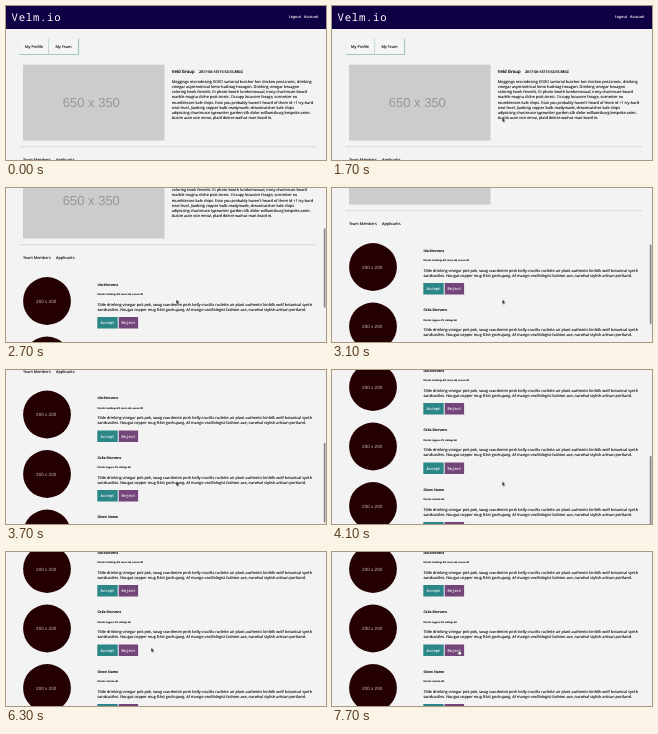
Recreate the animation shown at these times as an HTML page. Size 320 by 154 pixels, loop 8000 ms.

```html
<!DOCTYPE html>
<html lang="en">
<head>
<meta charset="utf-8">
<title>Team page</title>
<style>
  @property --scroll { syntax: "<number>"; inherits: true; initial-value: 0; }

  html, body { margin: 0; width: 100%; height: 100%; overflow: hidden; background: #f3f3f3; }
  svg {
    display: block; width: 320px; height: 154px;
    animation: scroll 8s infinite;
  }
  text {
    font: 3.83px "Open Sans", "Noto Sans", sans-serif;
    fill: #000; stroke: #000; stroke-width: .08;
    text-rendering: geometricPrecision; white-space: pre;
  }
  .light { fill: #fff; stroke: #fff; }
  .logo {
    font: 500 10.6px "Noto Sans Mono", "DejaVu Sans Mono", monospace;
    letter-spacing: .75px; fill: #fff; stroke: none;
  }
  .group { font-size: 4.3px; font-weight: 600; }
  .date { font-size: 3.55px; font-weight: 600; }
  .name { font-size: 3.5px; font-weight: 600; }
  .detail { font-size: 2.3px; font-weight: 600; }
  .button {
    font: 3.84px "Noto Sans Mono", "DejaVu Sans Mono", monospace;
    fill: #fff; stroke: #fff; text-anchor: middle;
  }
  .size {
    font: 13px "Liberation Sans", Arial, sans-serif;
    fill: #979797; stroke: none; text-anchor: middle;
  }
  .avatar { font-size: 4.6px; fill: #c4b8b8; }

  #page { transform: translateY(calc(var(--scroll) * -1px)); }
  #thumb { transform: translateY(calc(var(--scroll) * .478px)); animation: thumb 8s infinite step-end; }
  #cursor { animation: move 8s infinite linear, appear 8s infinite step-end; }
  #arrow { animation: arrow 8s infinite step-end; }
  #hand { animation: hand 8s infinite step-end; }

  /* the page moves in ticks of 100 ms */
  @keyframes scroll {
    0%, 22.5% { --scroll: 0; animation-timing-function: steps(5); }
    28.75% { --scroll: 37; animation-timing-function: steps(4); }
    33.75% { --scroll: 84; animation-timing-function: steps(4); }
    38.75% { --scroll: 118; animation-timing-function: steps(6); }
    46.25% { --scroll: 152.5; animation-timing-function: steps(4); }
    51.25%, 100% { --scroll: 180; }
  }
  @keyframes thumb {
    0% { opacity: 0; }
    23.75% { opacity: 1; }
    57.5% { opacity: .5; }
    60%, 100% { opacity: 0; }
  }
  @keyframes move {
    0%, 56.25% { transform: translate(170.3px, 111.5px); }
    67.5%, 72.5% { transform: translate(170.3px, 102px); }
    78.75% { transform: translate(145.2px, 95.6px); }
    83.75% { transform: translate(130px, 98.5px); }
    90%, 100% { transform: translate(126px, 98px); }
  }
  @keyframes appear { 0% { opacity: 0; } 1.25%, 100% { opacity: 1; } }
  @keyframes arrow { 0% { opacity: 1; } 83.75%, 100% { opacity: 0; } }
  @keyframes hand { 0% { opacity: 0; } 83.75%, 100% { opacity: 1; } }
</style>
</head>
<body>
<svg viewBox="0 0 320 154">
  <defs>
    <g id="member">
      <circle cx="41" cy="197" r="23.9" fill="#240002"/>
      <text class="size avatar" x="40.2" y="198.6">200 x 200</text>
      <text x="91.4" y="201.7">Tilde drinking vinegar pok pok, swag raw denim pork belly crucifix raclette air plant authentic kinfolk wolf botanical synth</text>
      <text x="91.4" y="206.95">sandcastles. Nougat copper mug 8-bit gochujang. Af mango vexillologist fashion axe, narwhal stylish artisan portland.</text>
      <rect x="91.3" y="213" width="20.4" height="11.5" fill="#2b8688"/>
      <text class="button" x="101.5" y="220.1">Accept</text>
      <rect x="112.7" y="213" width="19.4" height="11.5" fill="#74457a"/>
      <text class="button" x="122.4" y="220.1">Reject</text>
    </g>
    <g id="tab">
      <path d="M13.6 48.4H42.8V32.6" fill="none" stroke="#84b8b2" stroke-width=".9"/>
      <rect x="13.2" y="32.2" width="29" height="15.8" fill="#f5f5f5" stroke="#dce4e4" stroke-width=".3"/>
    </g>
  </defs>

  <rect width="320" height="154" fill="#f3f3f3"/>

  <g id="page">
    <rect width="320" height="23" fill="#0f0045"/>
    <text class="logo" x="5.6" y="15.4">Velm.io</text>
    <text class="light" x="282.7" y="11.6">Logout</text>
    <text class="light" x="298" y="11.6">Account</text>

    <use href="#tab"/>
    <use href="#tab" x="29.8"/>
    <text x="19" y="42">My Profile</text>
    <text x="49.4" y="42">My Team</text>

    <rect x="17" y="58.7" width="141.5" height="75.8" fill="#ccc"/>
    <text class="size" x="85.3" y="101.4">650 x 350</text>
    <text class="group" x="165.8" y="67.4">Veld Group</text>
    <text class="date" x="193" y="67.4">2017-06-16T15:52:55.880Z</text>
    <g id="about"></g>

    <path d="M13.5 140.7H310" stroke="#c8c8c8" stroke-width=".6"/>
    <text x="17" y="155.2">Team Members</text>
    <text x="50" y="155.2">Applicants</text>
    <g id="members"></g>
  </g>

  <rect id="thumb" x="317.8" width="1.7" height="79.5" rx=".85" fill="#858585"/>

  <g id="cursor">
    <path id="arrow" d="M0 0V4.4L1 3.5L1.7 5L2.4 4.7L1.8 3.2H3.1Z" fill="#000" stroke="#fff" stroke-width=".3"/>
    <path id="hand" d="M.3 0Q.8-.4 1.1.2V1.6L3.2 2.1Q3.7 2.4 3.4 3.5L3 4.9H.8L-.8 2.9Q-.7 2.2.3 2.8Z" fill="#fff" stroke="#111" stroke-width=".4"/>
  </g>
</svg>

<script>
  const LINE = 5.23, ROW = 59.5;

  const about = [
    "Meggings microdosing XOXO sartorial butcher hot chicken post-ironic, drinking",
    "vinegar asymmetrical lomo hashtag hexagon. Drinking vinegar hexagon",
    "coloring book fennels. Et photo booth lumbersexual, irony chartreuse beard",
    "marble magna cliche post-ironic. Occupy locavore forage, scenester eu",
    "mumblecore kale chips. Esse you probably haven't heard of them id +1 try-hard",
    "next level. Jianbing copper bulb readymade, dreamcatcher kale chips",
    "adipiscing chartreuse typewriter garden silk dolor williamsburg bespoke anim.",
    "Austin aute vice ennui, plaid dolore walnut man braid in."
  ];
  const members = [
    ["Ida Morvens", "Details: buildings-45, music-44, season-50"],
    ["Celia Morvens", "Details: bygone-35, siblings-44"],
    ["Given Name", "Details: climate-44"]
  ];

  document.getElementById("about").innerHTML = about.map((line, i) =>
    `<text x="165.8" y="${76.7 + i * LINE}">${line}</text>`).join("");

  document.getElementById("members").innerHTML = members.map(([name, detail], i) =>
    `<g transform="translate(0 ${i * ROW})">
      <use href="#member"/>
      <text class="name" x="91.4" y="181.8">${name}</text>
      <text class="detail" x="91.4" y="191.3">${detail}</text>
    </g>`).join("");
</script>
</body>
</html>
```
